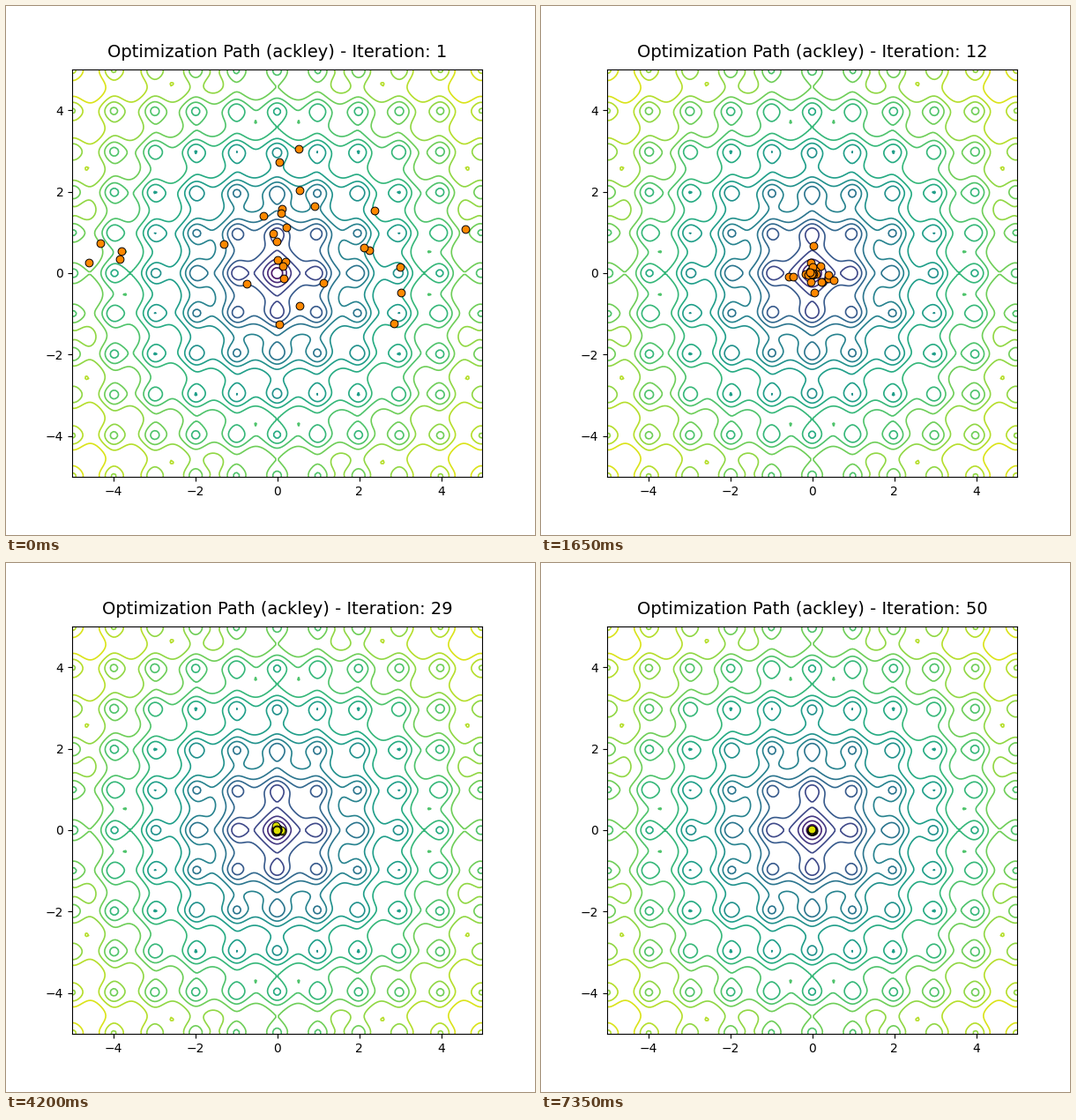
These frames come from a looping animation (600x600 px, 7500 ms). A matplotlib script:

```python
import numpy as np
import matplotlib.pyplot as plt
from matplotlib.animation import FuncAnimation

ITERATIONS = 50
SWARM = 30
ORANGE, YELLOW = "#ff8800", "#dde000"
YELLOW_FROM = 16


def ackley(x, y):
    slow = -20 * np.exp(-0.2 * np.sqrt(0.5 * (x**2 + y**2)))
    ripple = -np.exp(0.5 * (np.cos(2 * np.pi * x) + np.cos(2 * np.pi * y)))
    return slow + ripple + np.e + 20


# Each particle swings around the optimum while its reach decays.
rng = np.random.default_rng(7)
shape = (SWARM, 2)
reach = rng.normal(0, (2.9, 2.1), shape)
phase = rng.uniform(0, 2 * np.pi, shape)
speed = rng.uniform(0.3, 1.2, shape)
decay = rng.uniform(0.12, 0.32, (SWARM, 1))
rest = np.clip(rng.normal(0, 0.012, shape), -0.025, 0.025)


def swarm_at(it):
    swing = reach * np.cos(speed * it + phase)
    return np.clip(swing * np.exp(-decay * (it - 1)) + rest, -4.6, 4.6)


fig, ax = plt.subplots(figsize=(6, 6), dpi=100)
grid = np.linspace(-5, 5, 200)
X, Y = np.meshgrid(grid, grid)
ax.contour(X, Y, ackley(X, Y), levels=20, cmap="viridis", linewidths=1.2)
ax.set_xlim(-5, 5)
ax.set_ylim(-5, 5)
dots = ax.scatter(*swarm_at(1).T, s=40, c=ORANGE, edgecolors="black",
                  linewidths=0.7, zorder=3)
title = ax.set_title("", fontsize=14, pad=10)


def update(i):
    it = i + 1
    dots.set_offsets(swarm_at(it))
    dots.set_facecolor(YELLOW if it >= YELLOW_FROM else ORANGE)
    title.set_text(f"Optimization Path (ackley) - Iteration: {it}")
    return dots, title


anim = FuncAnimation(fig, update, frames=ITERATIONS, interval=150,
                     repeat=True, repeat_delay=0)
plt.show()
```
